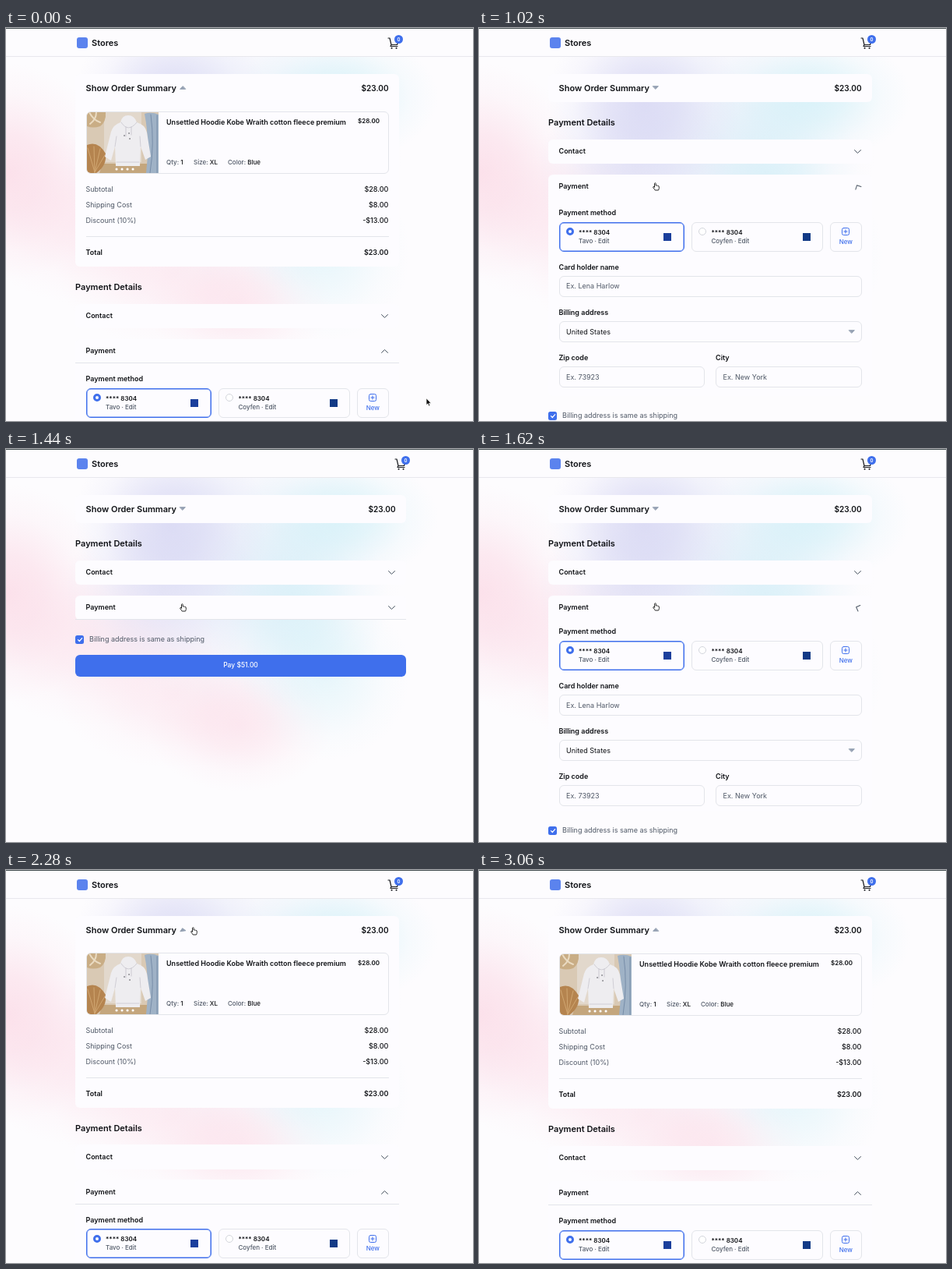
Animation, 600 px wide and 504 px high, one loop 3.12 s. Source, as an HTML page:

```html
<!DOCTYPE html>
<html lang="en">
<head>
<meta charset="utf-8">
<title>Checkout</title>
<style>
html, body { margin: 0; width: 100%; height: 100%; overflow: hidden; }
#stage { position: relative; width: 600px; height: 504px; overflow: hidden; background: #fdfcfe;
  font: 400 9px/0 Inter, sans-serif; color: #101216; }
#stage * { box-sizing: border-box; }
#glow, header, .abs, .t { position: absolute; }
#glow { inset: 0; }
header { inset: 0 0 auto; height: 37px; background: #fdfcfe; border-top: 1px solid #455052; border-bottom: 1px solid #e8e8ed; }
.col { position: absolute; left: 89px; }
main.col { top: 59px; }
.t { white-space: pre; line-height: 0; }
.b { font-weight: 600; }
.m { font-weight: 500; }
.l { font-size: 11px; }
.p { font-size: 10px; }
.s { font-size: 8px; }
.g { color: #4f5866; }
.blue { color: #3f6fec; }
.panel { position: relative; background: #fdfcff; border-radius: 6px; }
.head { position: relative; height: 31.5px; }
.body { position: relative; overflow: hidden; }
.in { position: absolute; left: 13.5px; right: 13.5px; }
.box { position: absolute; border: 1px solid #e3e5ea; border-radius: 6px; background: #fdfcff; }
.cards { position: absolute; top: 19.5px; width: 100%; height: 38px; display: flex; gap: 9px; }
.cards .box { position: relative; flex-basis: 0; }
.cards .on { border-color: #3f6fec; box-shadow: inset 0 0 0 .5px #3f6fec; }
.radio { position: absolute; left: 8.5px; top: 6.5px; width: 10px; height: 10px; border-radius: 50%; border: 1px solid #d3d6dc; background: #fff; }
.on .radio { border: 3px solid #3f6fec; }
.rule { position: absolute; height: 1px; background: #e3e5ea; }
svg { position: absolute; overflow: visible; fill: none; stroke-linecap: round; stroke-linejoin: round; }
</style>
</head>
<body>
<div id="stage"></div>
<script>
const stage = document.getElementById('stage');
const $ = id => document.getElementById(id);

// y is the middle of the capitals; a negative x counts from the right edge
const side = x => x < 0 ? `right:${-x}px` : `left:${x}px`;
const text = (s, x, y, cls = '') => `<span class="t ${cls}" style="${side(x)};top:${y}px">${s}</span>`;
const block = (x, y, w, h, css) => `<i class="abs" style="${side(x)};top:${y}px;width:${w}px;height:${h}px;${css}"></i>`;
const chevron = (id, y) => `<svg id="${id}" style="right:14.5px;top:${y}px" width="9" height="5"><path d="M.5 .5 4.5 4.5 8.5 .5" stroke="#4b5563"/></svg>`;
const caret = (id, css) => `<svg id="${id}" style="${css}" width="8" height="5" viewBox="0 0 8 5"><path d="M.6 .7h6.8L4 4.2z" fill="#94a0b2" stroke="#94a0b2"/></svg>`;
const row = (name, value, y, a = 'g', b = 'm') => text(name, 0, y, a) + text(value, -.1, y, b);
const detail = (name, value, x) => text(`<span class="g">${name}:</span> ${value}`, x, 63.5, 's m');
const field = (label, hint, y, css, cls = 'g') => `<div class="abs" style="top:${y}px;${css}">
  ${text(label, 0, 0, 'b')}<div class="box" style="top:11px;width:100%;height:27px">${text(hint, 8.5, 12.7, cls)}</div></div>`;
const card = (name, grow, color, cls = '') => `<div class="box ${cls}" style="flex-grow:${grow}">
  <i class="radio"></i>${text('**** 8304', 24.5, 12, 's b')}${text(name + ' · Edit', 24.5, 23, 's m g')}
  ${block(-15.5, 13, 10, 10, 'background:' + color)}</div>`;

const photo = `<svg width="92" height="78" viewBox="0 0 92 78" style="overflow:hidden;border-radius:5px 0 0 5px">
  <path d="M0 0h92v78H0z" fill="#d9c9b4"/><path d="M22 0h48v64H22z" fill="#e2d8cc"/>
  <path d="M0 0h24q1 12-7 18-9 3-17 0z" fill="#c9ad85"/><path d="M3 0q5 10 14 13M12 0q0 9-8 15" stroke="#eadbc2" stroke-width="2"/>
  <path d="M20 66h58v12H16z" fill="#c4a67d"/>
  <path d="M0 42q14-6 24 11 2 15-12 25H0z" fill="#b5844f"/><path d="M10 77 1 46M10 77 9 44M10 77 17 47M10 77 23 55" stroke="#d0a671"/>
  <path d="M74 2q9-3 18 1v75H76q5-40-2-76z" fill="#9fb2c6"/><path d="M82 3q5 36-1 75M90 4v74" stroke="#778da8"/>
  <g transform="translate(4,-4)"><path d="M39 17q2-9 10-9t11 9q11 3 13 13l5 31-7 4-6-17-1 25H33l-1-25-5 18-8-5 8-32q3-9 12-12z" fill="#eeedf0"/>
  <path d="M40 17q9 14 20 0M34 35l-2 13M64 35l1 13M34 68h29" stroke="#d0ced5"/>
  <path d="M46 23v12M53 23v10" stroke="#c3c1c9" stroke-width=".8"/><path d="M44 34h.1M51 38h.1M50 31h.1" stroke="#45444b" stroke-width="1.5"/></g>
  <path d="M38 73h.1M45 73h.1M52 73h.1M59 73h.1" stroke="#fff" stroke-width="3"/></svg>`;

stage.innerHTML = `<div id="glow"></div>
<header><div class="col">
  ${block(2, 11, 14, 14, 'background:#5b83ee;border-radius:3px')}${text('Stores', 21, 18, 'b l')}
  <svg style="right:0;top:10px" width="15" height="16"><path d="M1 2h2l2 8.5h7.5l1.2-5M5 10.5l-1 2h9" stroke="#17191e" stroke-width="1.2"/>
    <path d="M5.5 14.7h.1M11.5 14.7h.1" stroke="#17191e" stroke-width="2"/></svg>
  <div class="abs" style="right:-5px;top:8px;width:11px;height:11px;border-radius:50%;background:#3f6fec;color:#fff;font:600 6px/11px Inter,sans-serif;text-align:center">0</div>
</div></header>
<main class="col">
  <section class="panel">
    <div class="head" style="height:36px">${text('Show Order Summary', 13.5, 18.3, 'b l')}${text('$23.00', -13.5, 18, 'b p')}${caret('sumIcon', 'left:133.5px;top:15px')}</div>
    <div class="body" id="sumBody"><div class="in" id="sumIn">
      <div class="box" style="width:100%;height:79.5px">${photo}
        ${text('Unsettled Hoodie Kobe Wraith cotton fleece premium', 102.5, 13, 'b')}${text('$28.00', -10.5, 11.3, 's b')}
        ${detail('Qty', '1', 102.5)}${detail('Size', 'XL', 137.5)}${detail('Color', 'Blue', 181.5)}</div>
      ${row('Subtotal', '$28.00', 99.5)}${row('Shipping Cost', '$8.00', 120)}${row('Discount (10%)', '-$13.00', 140)}
      <i class="rule" style="top:160px;width:100%"></i>
      ${row('Total', '$23.00', 181, 'b', 'b')}
    </div></div>
  </section>
  <div style="position:relative;height:47.5px">${text('Payment Details', 0, 26, 'b l')}</div>
  <section class="panel"><div class="head">${text('Contact', 13.5, 15.7, 'b')}${chevron('', 13.5)}</div></section>
  <section class="panel" style="margin-top:13.5px">
    <div class="head">${text('Payment', 13.5, 15.7, 'b')}${chevron('payIcon', 13.5)}<i class="rule" id="payRule" style="left:0;right:0;bottom:0"></i></div>
    <div class="body" id="payBody"><div class="in" id="payIn">
      ${text('Payment method', 0, 8, 'b')}
      <div class="cards">
        ${card('Tavo', 162, '#1b3f9c', 'on')}
        ${card('Coyfen', 170, '#123a86')}
        <div class="box" style="flex-grow:39"><svg style="left:50%;top:6.5px;margin-left:-5px" width="10" height="10">
          <path d="M2.5 .5h5q2 0 2 2v5q0 2-2 2h-5q-2 0-2-2v-5q0-2 2-2zM5 2.8v4.4M2.8 5h4.4" stroke="#3f6fec"/></svg>
          <div class="abs s m blue" style="top:24px;width:100%;text-align:center;line-height:0">New</div></div>
      </div>
      ${field('Card holder name', 'Ex. Lena Harlow', 77.5, 'width:100%')}
      ${field('Billing address', 'United States', 136, 'width:100%', '')}${caret('', 'right:8.5px;top:158px')}
      ${field('Zip code', 'Ex. 73923', 194, 'width:calc(50% - 7px)')}
      ${field('City', 'Ex. New York', 194, 'left:calc(50% + 7px);width:calc(50% - 7px)')}
    </div></div>
  </section>
  <div style="position:relative;height:73px">
    ${block(0, 19.5, 11, 11, 'background:#3f6fec;border-radius:2.5px')}
    <svg style="left:2.5px;top:22.5px" width="6" height="5"><path d="M.5 2.7 2.3 4.5 5.7 .7" stroke="#fff" stroke-width="1.2"/></svg>
    ${text('Billing address is same as shipping', 18, 25, 'g')}
    <div class="abs m" style="top:45px;width:100%;height:27.5px;border-radius:6px;background:#3f6fec;color:#fff;font-size:8.5px;line-height:27.5px;text-align:center">Pay $51.00</div>
  </div>
</main>
<svg id="arrow" style="left:-.5px;top:0" width="8" height="12"><path d="M.5 .5v8.6l2-1.8 1.4 3.2 1.5-.7L4 6.7h2.6z" fill="#111" stroke="#fff" stroke-width=".7"/></svg>
<svg id="hand" style="left:-4px;top:-5px" width="9" height="11"><path d="M2.5 6V1.3q.9-1.3 1.7 0V4q1-.8 1.5.2 1-.6 1.4.4 1.3-.3 1.2 1V7.5q0 1-.8 2.5H3.2Q2.5 8.5.7 6.6.5 5.2 1.6 5.4z" fill="#fff" stroke="#111" stroke-width=".9"/></svg>`;

const blob = (x, y, rx, ry, rgb, a) =>
  `radial-gradient(${rx}px ${ry}px at ${x}px ${y}px,rgba(${rgb},${a}),rgba(${rgb},${a * .72}) 35%,rgba(${rgb},${a * .2}) 72%,rgba(${rgb},0))`;
const pink = '251,214,227', lilac = '208,207,241', cyan = '205,239,247', mist = '222,230,247';
$('glow').style.background = [
  blob(212, 95, 125, 120, lilac, .65), blob(200, 185, 125, 115, lilac, .4),
  blob(425, 88, 130, 85, cyan, .7), blob(370, 195, 120, 140, cyan, .6), blob(410, 290, 110, 110, cyan, .4),
  blob(300, 150, 210, 190, mist, .55),
  blob(0, 185, 135, 140, pink, .7), blob(110, 245, 160, 110, pink, .45),
  blob(215, 315, 150, 95, pink, .4), blob(300, 355, 120, 85, pink, .5)].join();

// cubic-bezier(.4, 0, .2, 1)
function ease(x) {
  if (x <= 0) return 0;
  if (x >= 1) return 1;
  let lo = 0, hi = 1, s;
  for (let i = 0; i < 20; i++) {
    s = (lo + hi) / 2;
    const bx = 1.2 * (1 - s) ** 2 * s + .6 * (1 - s) * s * s + s ** 3;
    if (bx < x) lo = s; else hi = s;
  }
  return 3 * (1 - s) * s * s + s ** 3;
}

const LOOP = 3120, STEP = 60, FADE = 300;
const openness = (t, close, open) => 1 - ease((t - close) / FADE) + ease((t - open) / FADE);

// time, x, y of the pointer
const path = [[30, 539.5, 474.5], [400, 268, 86], [600, 268, 86], [930, 227, 203],
  [1600, 227, 203], [1980, 241, 78], [2300, 241, 78], [2680, 470, 514]];

function pointer(t) {
  let i = 0;
  while (i < path.length - 2 && t > path[i + 1][0]) i++;
  const [t0, x0, y0] = path[i], [t1, x1, y1] = path[i + 1];
  const u = Math.min(1, Math.max(0, (t - t0) / (t1 - t0))), k = u * u * (3 - 2 * u);
  return [x0 + (x1 - x0) * k, y0 + (y1 - y0) * k];
}

// Height is capped by a shrinking maximum while the padding shrinks too
function fold(name, q, max, inner) {
  const h = Math.min(max * q, inner + 24 * q);
  $(name + 'Body').style.height = h + 'px';
  $(name + 'In').style.top = 12 * q + 'px';
  $(name + 'Icon').style.transform = `rotate(${180 * q}deg)`;
  return h;
}

const cols = document.querySelectorAll('.col'), heads = [...document.querySelectorAll('.head')];

function draw(t) {
  const pay = openness(t, 957, 1500);
  const extra = fold('sum', openness(t, 400, 2064), 233, 187) + fold('pay', pay, 400, 233);
  $('payRule').style.opacity = pay > 0 && pay < 1 ? 0 : 1;
  // The column widens when the page no longer scrolls
  cols.forEach(c => c.style.width = (extra + 300 > 504 ? 416 : 425) + 'px');
  const [x, y] = pointer(t);
  const over = heads.some(h => {
    const r = h.getBoundingClientRect();
    return x > r.left && x < r.right && y > r.top && y < r.bottom;
  });
  for (const id of ['arrow', 'hand']) {
    $(id).style.transform = `translate(${x}px,${y}px)`;
    $(id).style.display = t < 2700 && over === (id === 'hand') ? '' : 'none';
  }
}

const start = performance.now();
function tick() {
  const t = (performance.now() - start) % LOOP;
  draw(Math.floor(t / STEP) * STEP);
  requestAnimationFrame(tick);
}
tick();
</script>
</body>
</html>
```
